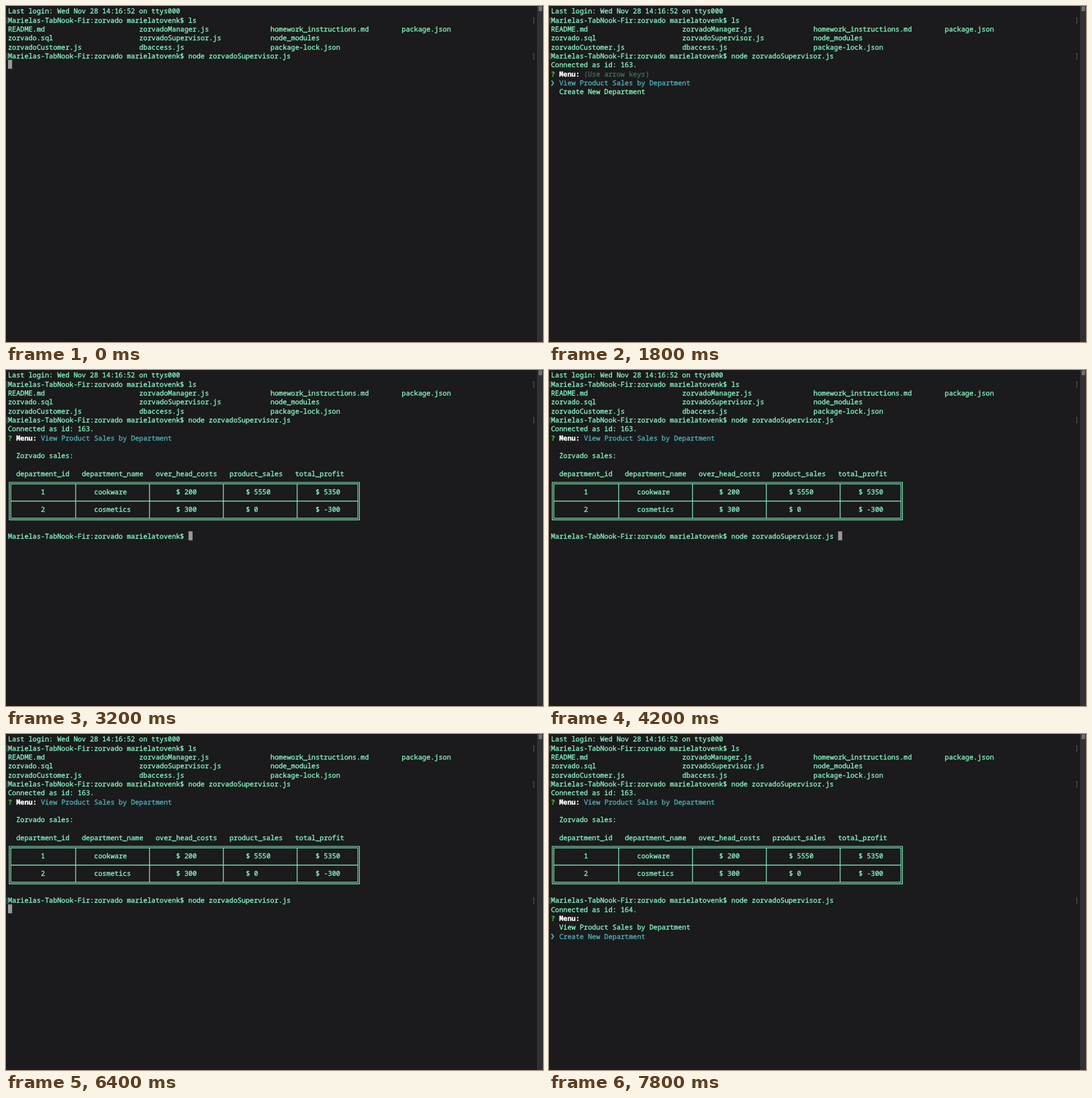
An HTML page for the animation above (8000 ms loop, 800 by 500 pixels).

```html
<!DOCTYPE html>
<html lang="en">
<head>
<meta charset="utf-8">
<title>Terminal session</title>
<style>
  html, body { margin: 0; width: 100%; height: 100%; overflow: hidden; background: #1b1a1c; }
  svg { display: block; width: 800px; height: 500px; }
  text {
    font: 500 10.18px "Noto Sans Mono", "DejaVu Sans Mono", monospace;
    white-space: pre;
    font-variant-ligatures: none;
    text-rendering: geometricPrecision;
    stroke-width: 0.32px;
  }
  text.bold { font-weight: 700; }
</style>
</head>
<body>
<svg id="stage" viewBox="0 0 800 500" xmlns="http://www.w3.org/2000/svg">
  <rect width="800" height="500" fill="#1b1a1c"/>
  <g id="screen"></g>
  <g id="scrollbar">
    <rect x="791.5" width="8.5" height="500" fill="#2f3133"/>
    <rect x="791.5" width="0.8" height="500" fill="#3a3c3e"/>
    <rect x="793.6" y="0.8" width="5" height="6.6" rx="1" fill="#838587"/>
    <path d="M794.6 2.8h3M794.6 5.2h3" stroke="#3a3c3e" stroke-width="0.8"/>
  </g>
</svg>
<script>
const LOOP = 8000, STEP = 200;
const LEFT = 3, CELL = 6.11, ROW = 40 / 3;
const MINT = '#82f8c1', CYAN = '#4cb2b8', GREEN = '#43b53f', DIM = '#42705d', WHITE = '#ffffff';
const PROMPT = 'Marielas-TabNook-Fir:zorvado marielatovenk$ ';
const COMMAND = 'node zorvadoSupervisor.js';
const CHOICES = ['View Product Sales by Department', 'Create New Department'];

const colX = col => LEFT + col * CELL;
const midX = col => colX(col + 0.5);
const midY = row => 8 + row * ROW;
const escapeText = s => s.replace(/&/g, '&amp;').replace(/</g, '&lt;');

function write(row, col, str, color = MINT, cls = '') {
  return `<text x="${colX(col).toFixed(2)}" y="${(midY(row) + 3.3).toFixed(2)}" fill="${color}" stroke="${color}" class="${cls}">${escapeText(str)}</text>`;
}

// Writes several cells in one row, given as column, text, column, text...
function cells(row, ...parts) {
  let out = '';
  for (let i = 0; i < parts.length; i += 2) out += write(row, parts[i], parts[i + 1]);
  return out;
}

function stroke(d, color, width) {
  return `<path d="${d}" fill="none" stroke="${color}" stroke-width="${width}"/>`;
}

function cursor(row, col) {
  return `<rect x="${colX(col)}" y="${midY(row) - 7.9}" width="${CELL}" height="${ROW}" fill="#98979a"/>`;
}

// Faint marks at both ends of an entered command line
function marks(row) {
  const y = midY(row) - 4.2;
  return stroke(`M2.8 ${y}H1.5v8.6H2.8M785 ${y}h1.4v8.6h-1.4`, '#69686b', 0.8);
}

function entered(row, command) {
  return marks(row) + write(row, 0, PROMPT + command);
}

function question(row) {
  return write(row, 0, '?', GREEN, 'bold') + write(row, 2, 'Menu:', WHITE, 'bold');
}

function menu(row, picked, hint) {
  let out = question(row);
  if (hint) out += write(row, 8, '(Use arrow keys)', DIM);
  CHOICES.forEach((label, i) => {
    const r = row + 1 + i;
    out += write(r, 2, label, i === picked ? CYAN : MINT);
    if (i === picked) out += stroke(`M3.7 ${midY(r) - 4}l3 4l-3 4`, CYAN, 1.7);
  });
  return out;
}

function tableGrid() {
  const lineY = row => midY(row) + 0.4;
  const x0 = midX(0), x1 = midX(85), y0 = lineY(12), y1 = lineY(16), gap = 1.15;
  const box = g => `M${x0 - g} ${y0 - g}H${x1 + g}V${y1 + g}H${x0 - g}Z`;
  let inner = `M${x0 + gap} ${lineY(14)}H${x1 - gap}`;
  for (const col of [16, 34, 52, 70]) inner += `M${midX(col)} ${y0 + gap}V${y1 - gap}`;
  return stroke(box(gap) + box(-gap), MINT, 1.05) + stroke(inner, MINT, 1.15);
}

const listing =
  write(0, 0, 'Last login: Wed Nov 28 14:16:52 on ttys000') +
  entered(1, 'ls') +
  cells(2, 0, 'README.md', 32, 'zorvadoManager.js', 64, 'homework_instructions.md', 96, 'package.json') +
  cells(3, 0, 'zorvado.sql', 32, 'zorvadoSupervisor.js', 64, 'node_modules') +
  cells(4, 0, 'zorvadoCustomer.js', 32, 'dbaccess.js', 64, 'package-lock.json') +
  entered(5, COMMAND);

const connected = (row, id) => write(row, 0, `Connected as id: ${id}.`);

const report = listing + connected(6, 163) +
  question(7) + write(7, 8, CHOICES[0], CYAN) +
  write(9, 2, 'Zorvado sales:') +
  cells(11, 2, 'department_id', 18, 'department_name', 36, 'over_head_costs', 54, 'product_sales', 70, 'total_profit') +
  tableGrid() +
  cells(13, 8, '1', 21, 'cookware', 41, '$ 200', 58, '$ 5550', 75, '$ 5350') +
  cells(15, 8, '2', 21, 'cosmetics', 41, '$ 300', 58, '$ 0', 75, '$ -300');

const rerun = report + entered(18, COMMAND);
const typed = PROMPT + COMMAND + ' ';

const scenes = [
  [0, listing + cursor(6, 0)],
  [400, listing + connected(6, 163) + menu(7, 0, true)],
  [2000, report + write(18, 0, PROMPT) + cursor(18, PROMPT.length)],
  [4000, report + write(18, 0, typed) + cursor(18, typed.length)],
  [6200, rerun + cursor(19, 0)],
  [6800, rerun + connected(19, 164) + menu(20, 0, true)],
  [7600, rerun + connected(19, 164) + menu(20, 1, false)]
];

const screenEl = document.getElementById('screen');
let shown = null;

function render(ms) {
  const t = Math.floor((ms % LOOP) / STEP) * STEP;
  const scene = scenes.filter(([start]) => start <= t).pop();
  if (scene === shown) return;
  shown = scene;
  screenEl.innerHTML = scene[1];
}

const began = performance.now();
function tick() {
  render(performance.now() - began);
  requestAnimationFrame(tick);
}
tick();
</script>
</body>
</html>
```
